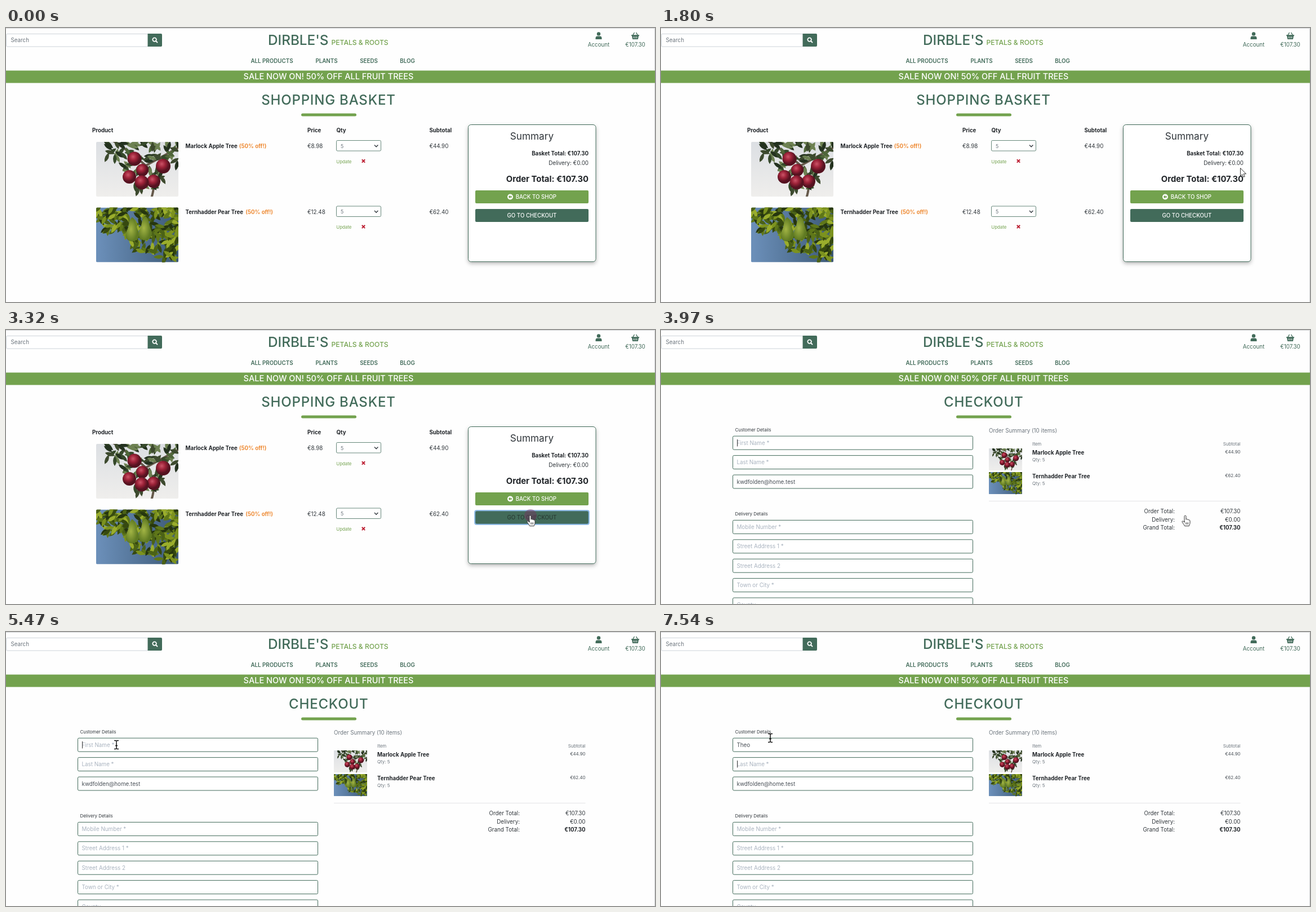
Animation of 1152x486 px, one loop 8000 ms. Source, as an HTML page:

```html
<!DOCTYPE html>
<html lang="en">
<head>
<meta charset="utf-8">
<title>Basket to checkout</title>
<style>
  html, body { margin: 0; width: 100%; height: 100%; overflow: hidden; background: #fefefe; }
  svg { display: block; }
  text { font: 400 9.8px Inter, sans-serif; fill: #30363b; white-space: pre; }
  .b { font-weight: 700; font-size: 9.7px; fill: #212529; }
  .nav { font-weight: 600; }
  .mid { text-anchor: middle; }
  .end { text-anchor: end; }
  .dark { fill: #426b5a; }
  .leaf { fill: #73a24e; }
  .white { fill: #fff; }
  .sale { fill: #ee8a33; }
  .grey { fill: #6c757d; }
  .field { fill: #495057; }
  .hint { fill: #a9b3bf; }
  .small { font-size: 7.9px; }
  .title { font-size: 24px; font-weight: 500; letter-spacing: .8px; }
  .button { font-size: 9.7px; font-weight: 500; }
  .box { fill: #fff; stroke: #426b5a; }
  .pointer { fill: #fff; stroke: #333; stroke-width: 1; stroke-linejoin: round; }
</style>
</head>
<body>
<svg width="1152" height="486" viewBox="0 0 1152 486">
  <defs>
    <filter id="shade" x="-10%" y="-10%" width="120%" height="120%">
      <feDropShadow dx="0" dy="3" stdDeviation="3.5" flood-color="#000" flood-opacity=".28"/>
    </filter>
    <linearGradient id="cloud" x2="0" y2="1">
      <stop offset="0" stop-color="#dcdfe3"/><stop offset="1" stop-color="#efeeec"/>
    </linearGradient>
    <linearGradient id="sky" x2="1" y2="0">
      <stop offset="0" stop-color="#6c90ba"/><stop offset="1" stop-color="#3d5a78"/>
    </linearGradient>
    <radialGradient id="red" cx=".4" cy=".35">
      <stop offset="0" stop-color="#cb5468"/><stop offset=".5" stop-color="#9c2238"/><stop offset="1" stop-color="#551220"/>
    </radialGradient>
    <radialGradient id="lime" cx=".4" cy=".5">
      <stop offset="0" stop-color="#a3b545"/><stop offset="1" stop-color="#5f7a22"/>
    </radialGradient>
    <clipPath id="crop"><rect width="146" height="97" rx="2"/></clipPath>
    <g id="apples" clip-path="url(#crop)">
      <rect width="146" height="97" fill="url(#cloud)"/>
      <path d="M30-2Q66 22 88 42T98 100M146 10Q118 26 88 42" fill="none" stroke="#65594a" stroke-width="4"/>
      <g id="appleLeaves"></g>
      <g id="fruit" fill="url(#red)"></g>
    </g>
    <g id="pears" clip-path="url(#crop)">
      <rect width="146" height="97" fill="url(#sky)"/>
      <g id="pearLeaves"></g>
      <path id="pear" d="M64 17C72 22 70 33 75 42 79 55 69 60 63 60 53 59 50 50 54 42 59 33 57 22 64 17Z" fill="url(#lime)"/>
      <use href="#pear" x="23" y="-2"/>
    </g>
  </defs>

  <!-- header -->
  <rect width="1152" height="486" fill="#fefefe"/>
  <path d="M0 .5H1151.5V486" fill="none" stroke="#d2d4d5"/>
  <rect x=".5" y="10.5" width="252" height="22.5" rx="2" fill="#fff" stroke="#ced4da"/>
  <text x="8.5" y="25" class="grey">Search</text>
  <path d="M251.5 10H275a2 2 0 0 1 2 2V31a2 2 0 0 1-2 2H251.5Z" class="dark"/>
  <g fill="none" stroke="#fff" stroke-width="1.8"><circle cx="263.6" cy="20.6" r="3.3"/><path d="M266 23l3 3"/></g>
  <text x="465" y="30" class="dark" style="font-size:24.3px;font-weight:500">DIRBLE'S</text>
  <text x="577.5" y="30" class="leaf" style="font-size:12.1px;font-weight:500">PETALS &amp; ROOTS</text>
  <g class="dark"><circle cx="1052" cy="10.4" r="3.2"/><path d="M1046.5 20V18Q1046.5 14.6 1050 14.6H1054Q1057.5 14.6 1057.5 18V20Z"/></g>
  <text x="1052" y="32.5" class="mid dark">Account</text>
  <path d="M1110 12.2H1124V14H1123L1121.8 20H1112.2L1111 14H1110Z" class="dark"/>
  <path d="M1112.5 13L1115.5 8M1121.5 13L1118.5 8" stroke="#426b5a" stroke-width="1.4"/>
  <path d="M1114.4 15v3.4M1117 15v3.4M1119.6 15v3.4" stroke="#fefefe" stroke-width=".9"/>
  <text x="1117" y="32.5" class="mid dark">€107.30</text>
  <g class="mid">
    <text x="472" y="62" class="nav dark">ALL PRODUCTS</text>
    <text x="569" y="62" class="nav dark">PLANTS</text>
    <text x="644" y="62" class="nav dark">SEEDS</text>
    <text x="712.5" y="62" class="nav dark">BLOG</text>
  </g>
  <rect y="75.5" width="1152" height="22" class="leaf"/>
  <text x="572.5" y="91.3" class="mid white" style="font-size:14.5px;font-weight:500">SALE NOW ON! 50% OFF ALL FRUIT TREES</text>
  <rect x="524" y="151.5" width="98" height="5" rx="2.5" class="leaf"/>

  <g id="basket">
    <text x="572.5" y="135.5" class="mid dark title">SHOPPING BASKET</text>
    <text x="153" y="185.3" class="b">Product</text>
    <text x="535" y="185.3" class="b">Price</text>
    <text x="586.5" y="185.3" class="b">Qty</text>
    <text x="751.5" y="185.3" class="b">Subtotal</text>
    <g id="rows"></g>
    <rect x="820.5" y="171.5" width="226.5" height="243" rx="5" class="box" filter="url(#shade)"/>
    <text x="933.5" y="197.5" class="mid" style="font-size:17.2px">Summary</text>
    <text x="1034" y="226" class="end b">Basket Total: €107.30</text>
    <text x="1034" y="242.5" class="end">Delivery: €0.00</text>
    <text x="1034" y="273" class="end b" style="font-size:14.8px">Order Total: €107.30</text>
    <rect x="833" y="288" width="201" height="23" rx="2" class="leaf"/>
    <circle cx="895" cy="299.5" r="5" class="white"/>
    <path d="M891.8 299.5L895 296.5V298.6H898V300.4H895V302.5Z" class="leaf"/>
    <text x="904.7" y="303" class="white button">BACK TO SHOP</text>
    <rect x="833" y="321" width="201" height="23" rx="2" class="dark"/>
    <rect id="ring" x="832.2" y="320.2" width="202.6" height="24.6" rx="3" fill="none" stroke="#84b4e2" stroke-width="2"/>
    <text id="go" x="933.5" y="336" class="mid button">GO TO CHECKOUT</text>
    <circle id="ripple" cx="931" cy="329" fill="#75305f" opacity=".45"/>
  </g>

  <g id="checkout">
    <text x="572.8" y="135.5" class="mid dark title">CHECKOUT</text>
    <text x="131.5" y="180" class="small">Customer Details</text>
    <text x="131.5" y="329" class="small">Delivery Details</text>
    <g id="fields"></g>
    <text id="typed" x="134.5" y="203.7" class="field"></text>
    <rect id="caret" width="1" height="12.5" fill="#333"/>
    <text x="582" y="182.4" class="grey">Order Summary (10 items)</text>
    <text x="659" y="204.5" class="small grey">Item</text>
    <text x="1028.5" y="204.5" class="end small grey">Subtotal</text>
    <g id="items"></g>
    <path d="M582 303.5H1028.5" stroke="#e3e5e6"/>
    <g id="totals"></g>
  </g>

  <g id="cursor">
    <path id="arrow" class="pointer" d="M.5 .5V14.6L3.7 11.6 6 16.4 8.3 15.4 6.2 10.8H10.6Z"/>
    <g id="hand" class="pointer">
      <path d="M-2 1.6C-2-.5 1-.5 1 1.6V7.2C1.4 5.8 3.6 6 3.7 7.6 4.2 6.6 6 6.9 6.1 8.4 6.6 7.7 8 8 8 9.6V13C8 15.5 6.6 16.5 6.4 18.6H-1.6C-2 16.6-4.4 14.5-5.8 11.8-6.6 10.2-5 9.2-3.8 10.4L-2 12.2Z"/>
      <path d="M-2 10V12M.7 12.2V16M2.7 12.2V16M4.7 12.2V16" fill="none" stroke-width=".8"/>
    </g>
    <path id="beam" d="M-4-7.5H-1.5L0-6.5 1.5-7.5H4M0-6.5V6.5M-4 7.5H-1.5L0 6.5 1.5 7.5H4M-2 1.5H2" fill="none" stroke="#111" stroke-width="1.5"/>
  </g>
</svg>
<script>
const LOOP = 8000, CLICK = 3170, LOAD = 3970;
const $ = id => document.getElementById(id);
const show = (id, on) => $(id).setAttribute('visibility', on ? 'inherit' : 'hidden');
const clamp = v => Math.max(0, Math.min(1, v));

function random(seed) {
  return () => (seed = seed * 16807 % 2147483647) / 2147483647;
}

// Scatter leaves wherever the rule accepts the spot.
function leaves(seed, count, colours, accept) {
  const rnd = random(seed);
  let out = '';
  while (count) {
    const x = rnd() * 146, y = rnd() * 97, turn = rnd() * 180, pick = rnd();
    if (!accept(x, y)) continue;
    const colour = colours[Math.floor(pick * colours.length)];
    out += `<path d="M-9 0Q0-7 9 0Q0 6-9 0Z" fill="${colour}" transform="translate(${x} ${y})rotate(${turn})"/>`;
    count--;
  }
  return out;
}

$('appleLeaves').innerHTML = leaves(41, 95, ['#35482a', '#4f6639', '#24321f', '#6d8152', '#3d4a2e'],
  (x, y) => x > 18 && Math.abs(y - 22) < 20 || Math.hypot(x - 85, y - 54) < 36);
$('pearLeaves').innerHTML = leaves(97, 260, ['#4b6216', '#7c921f', '#26360f', '#9aad2c', '#5f7719', '#36490f'],
  (x, y) => y < 26 + x * .6 + 8 * Math.sin(x / 9));
$('fruit').innerHTML = [[82, 50, 11], [68, 30, 12.5], [119, 43, 13], [59, 62, 12], [102, 70, 12], [81, 72, 12.5]]
  .map(([x, y, r]) => `<circle cx="${x}" cy="${y}" r="${r}"/>`).join('');

const products = [
  { name: 'Marlock Apple Tree', photo: 'apples', price: '€8.98', sum: '€44.90', saleX: 413.8 },
  { name: 'Ternhadder Pear Tree', photo: 'pears', price: '€12.48', sum: '€62.40', saleX: 425.3 }
];

$('rows').innerHTML = products.map((p, i) => `<g transform="translate(0 ${i * 116.5})">
  <use href="#${p.photo}" x="160" y="202"/>
  <text x="318.5" y="213" class="b">${p.name}</text>
  <text x="${p.saleX}" y="213" class="b sale">(50% off!)</text>
  <text x="535" y="213">${p.price}</text>
  <rect x="586.5" y="199.5" width="79" height="18.5" rx="2" class="box" stroke-opacity=".8"/>
  <text x="594" y="212.5" class="grey" style="font-size:8.8px">5</text>
  <path d="M654 207.5l3.2 3.2 3.2-3.2" fill="none" stroke="#343a40" stroke-width="1.4"/>
  <text x="586.3" y="239.5" class="leaf small">Update</text>
  <path d="M631.8 233.2l5.4 5.4m0-5.4l-5.4 5.4" stroke="#bd2135" stroke-width="2"/>
  <text x="751.5" y="213">${p.sum}</text></g>`).join('');

$('items').innerHTML = products.map((p, i) => `<g transform="translate(0 ${i * 42})">
  <use href="#${p.photo}" transform="translate(582 210)scale(.404)"/>
  <text x="659" y="221" class="b">${p.name}</text>
  <text x="659" y="233" class="small grey">Qty: 5</text>
  <text x="1028.5" y="218.7" class="end small field">${p.sum}</text></g>`).join('');

$('totals').innerHTML = [['Order Total:', '€107.30'], ['Delivery:', '€0.00'], ['Grand Total:', '€107.30']]
  .map(([label, sum], i) => `<text x="912" y="${325 + i * 14.6}" class="end">${label}</text>
  <text x="1028.5" y="${325 + i * 14.6}" class="end ${i === 2 ? 'b' : ''}">${sum}</text>`).join('');

const field = (label, y, style = 'hint', id = '') =>
  `<rect x="127.5" y="${y}" width="426" height="24" rx="2" class="box"/>
  <text ${id && `id="${id}"`} x="134.5" y="${y + 15.5}" class="${style}">${label}</text>`;
$('fields').innerHTML = field('First Name *', 188.2, 'hint', 'firstHint') + field('Last Name *', 222.6) +
  field('kwdfolden@home.test', 257, 'field') +
  ['Mobile Number *', 'Street Address 1 *', 'Street Address 2', 'Town or City *', 'County']
    .map((label, i) => field(label, 337.4 + i * 34.4)).join('');

// Pointer moves: start, end, steps, from, to and one easing per axis.
const easeIn = e => p => p ** e;
const easeOut = e => p => 1 - (1 - p) ** e;
const smooth = p => p * p * (3 - 2 * p);
const moves = [
  [530, 650, 3, [1092, 486], [1128, 475], easeOut(1.5), easeOut(1.5)],
  [1110, 1870, 12, [1128, 475], [1014, 247], easeIn(1.5), easeOut(2.2)],
  [1940, 2304, 6, [1014, 247], [931, 329], smooth, smooth],
  [4370, 5130, 12, [931, 329], [205, 205], smooth, smooth],
  [5200, 5740, 7, [205, 205], [194, 188], easeOut(2), easeIn(2.2)]
];

function pointerAt(t) {
  const move = moves.filter(m => t >= m[0]).pop();
  if (!move) return null;
  const [start, end, steps, from, to, easeX, easeY] = move;
  const step = Math.floor((t - start) / (end - start) * (steps - 1) + .1) + 1;
  const p = Math.min(1, step / steps);
  return [from[0] + (to[0] - from[0]) * easeX(p), from[1] + (to[1] - from[1]) * easeY(p)];
}

function pointerKind(t, [x, y]) {
  if (t < LOAD) return y > 321 && x < 1000 ? 'hand' : 'arrow';
  if (t < 4370) return 'hand';
  return x < 553 ? 'beam' : 'arrow';
}

const NAME = 'Theo', TYPE = 6270, KEY = 110;
const caretOn = t => t < 4570 || t >= 5070 && t < 5570 || t >= 6090 && t < 7130 || t >= 7540;

function render(t) {
  const onCheckout = t >= LOAD;
  show('basket', !onCheckout);
  show('checkout', onCheckout);

  const at = pointerAt(t);
  show('cursor', at);
  if (at) {
    $('cursor').setAttribute('transform', `translate(${at})`);
    const kind = pointerKind(t, at);
    for (const id of ['arrow', 'hand', 'beam']) show(id, id === kind);
  }

  const hover = clamp((t - 2230) / 200);
  $('go').style.fill = `color-mix(in srgb, #293b34 ${hover * 100}%, #fff)`;
  const press = t < CLICK ? 0 : Math.min(3, Math.floor((t - CLICK) / 75) + 1) / 3;
  $('ring').setAttribute('opacity', press);
  $('ripple').setAttribute('r', 11 * press);

  const keys = t < TYPE ? 0 : Math.min(NAME.length, Math.floor((t - TYPE) / KEY) + 1);
  $('typed').textContent = NAME.slice(0, keys);
  show('firstHint', !keys);
  const onLast = t >= 7540;
  const width = keys && !onLast ? $('typed').getComputedTextLength() : 0;
  $('caret').setAttribute('x', Math.round(135 + width));
  $('caret').setAttribute('y', onLast ? 228 : 194);
  show('caret', caretOn(t));
}

const begin = performance.now();
function tick() {
  render((performance.now() - begin) % LOOP);
  requestAnimationFrame(tick);
}
tick();
</script>
</body>
</html>
```
